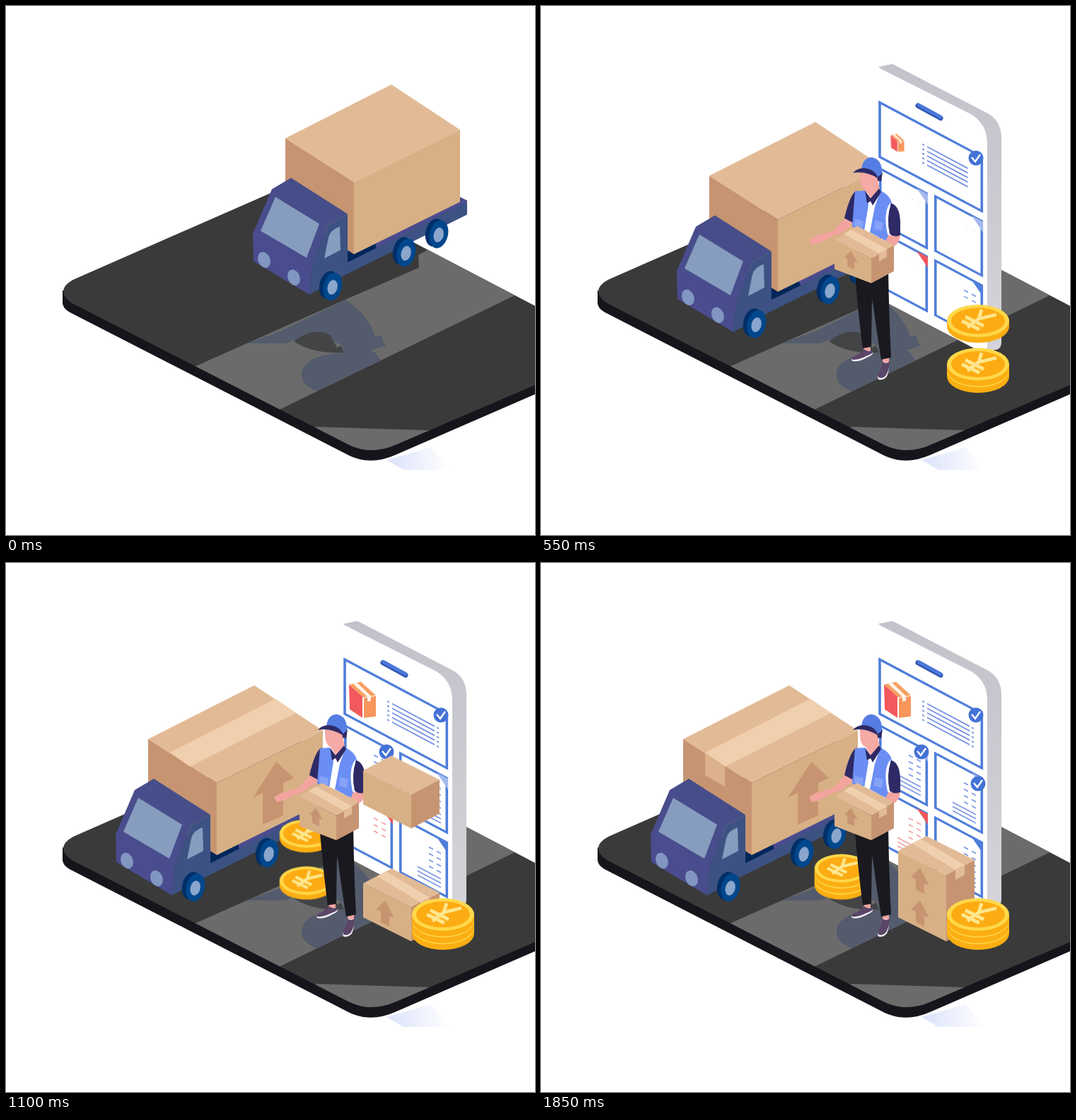
Animation of 748x748 px, one loop 2.9 s. Source, as an HTML page without scripts:

```html
<!DOCTYPE html>
<html lang="en">
<head>
<meta charset="utf-8">
<title>Delivery</title>
<style>
html, body { margin: 0; width: 100%; height: 100%; overflow: hidden; background: #fff; }
svg { display: block; width: 100%; height: 100%; }

/* every moving part shares one 2.9 s clock */
.a { animation: 2900ms linear infinite; }
.pop { transform-box: fill-box; transform-origin: center; }
.arm { transform-origin: 440px 280px; }

@keyframes drive {
  0%, 1.6% { transform: translate(0, 0); }
  12.07% { transform: translate(-125px, 35px); }
  18.97% { transform: translate(-157px, 53px); }
  25.86%, 100% { transform: translate(-194px, 62px); }
}
@keyframes phone {
  0%, 1.7% { opacity: 0; transform: translateY(24px); }
  8.62%, 100% { opacity: 1; transform: none; }
}
@keyframes person {
  0%, 3.4% { opacity: 0; transform: translateY(30px); }
  10.34%, 100% { opacity: 1; transform: none; }
}
@keyframes parcel {
  0%, 5.17% { transform: scale(0); }
  12.07% { transform: scale(1.08); }
  17.24%, 100% { transform: none; }
}
@keyframes swing {
  0%, 12.07% { transform: rotate(-12deg); }
  17.24%, 100% { transform: none; }
}

/* truck load markings */
@keyframes loadArrow {
  0%, 20.69% { clip-path: inset(100% 0 0 0); }
  25.86%, 100% { clip-path: inset(0); }
}
@keyframes loadTape {
  0%, 29.31% { clip-path: inset(0 0 0 100%); }
  36.21%, 100% { clip-path: inset(0); }
}
@keyframes loadFlap {
  0%, 39.66% { clip-path: inset(0 0 100% 0); }
  44.83%, 100% { clip-path: inset(0); }
}

/* screen content */
@keyframes lines {
  0%, 8.62% { clip-path: inset(-3px 100% -3px -3px); }
  12.07% { clip-path: inset(-3px 64% -3px -3px); }
  18.97% { clip-path: inset(-3px 12% -3px -3px); }
  20.69%, 100% { clip-path: inset(-3px); }
}
@keyframes icon {
  0%, 15.5% { transform: scale(0); }
  18.97% { transform: scale(.5); }
  25.86%, 100% { transform: none; }
}
@keyframes rows2 {
  0%, 20.69% { clip-path: inset(-3px -3px 100% -3px); }
  27.59%, 100% { clip-path: inset(-3px); }
}
@keyframes rows3 {
  0%, 25.86% { clip-path: inset(-3px -3px 100% -3px); }
  34.48%, 100% { clip-path: inset(-3px); }
}
@keyframes rows4 {
  0%, 17.24% { clip-path: inset(-3px -3px 100% -3px); }
  25.86%, 100% { clip-path: inset(-3px); }
}
@keyframes rows5 {
  0%, 34.48% { clip-path: inset(-3px -3px 100% -3px); }
  43.1%, 100% { clip-path: inset(-3px); }
}
@keyframes dot1 { 0%, 8.62% { transform: scale(0); } 12.07%, 100% { transform: none; } }
@keyframes dot2 { 0%, 32.76% { transform: scale(0); } 36.21%, 100% { transform: none; } }
@keyframes dot3 { 0%, 43.1% { transform: scale(0); } 46.55%, 100% { transform: none; } }
@keyframes tick1 { 0%, 13.79% { clip-path: inset(-3px 100% -3px -3px); } 18.97%, 100% { clip-path: inset(-3px); } }
@keyframes tick2 { 0%, 36.21% { clip-path: inset(-3px 100% -3px -3px); } 37.93%, 100% { clip-path: inset(-3px); } }
@keyframes tick3 { 0%, 48.28% { clip-path: inset(-3px 100% -3px -3px); } 53.45%, 100% { clip-path: inset(-3px); } }

/* coins: right stack, then left stack */
@keyframes coin1 {
  0%, 5.17% { opacity: 0; transform: translateY(-76px); }
  6.9% { opacity: 1; transform: translateY(-66px); }
  12.07%, 100% { opacity: 1; transform: none; }
}
@keyframes coin2 {
  0%, 10.34% { opacity: 0; transform: translateY(-74px); }
  12.07% { opacity: 1; transform: translateY(-62px); }
  17.24%, 100% { opacity: 1; transform: none; }
}
@keyframes coin3 {
  0%, 17.24% { opacity: 0; transform: translateY(-64px); }
  18.97% { opacity: 1; transform: translateY(-52px); }
  24.14%, 100% { opacity: 1; transform: none; }
}
@keyframes coin4 {
  0%, 25.86% { opacity: 0; transform: translateY(-116px); }
  27.59% { opacity: 1; transform: translateY(-106px); }
  34.48%, 100% { opacity: 1; transform: none; }
}
@keyframes coin5 {
  0%, 34.48% { opacity: 0; transform: translateY(-116px); }
  36.21% { opacity: 1; transform: translateY(-96px); }
  37.93% { opacity: 1; transform: translateY(-67px); }
  43.1%, 100% { opacity: 1; transform: none; }
}
@keyframes coin6 {
  0%, 41.38% { opacity: 0; transform: translateY(-100px); }
  43.1% { opacity: 1; transform: translateY(-80px); }
  48.28%, 100% { opacity: 1; transform: none; }
}

/* stacked crates */
@keyframes crate1 {
  0%, 20.69% { opacity: 0; transform: translateY(-110px); }
  22.41% { opacity: 1; transform: translateY(-70px); }
  25.86%, 100% { opacity: 1; transform: none; }
}
@keyframes crate2 {
  0%, 36.21% { opacity: 0; transform: translateY(-130px); }
  37.93% { opacity: 1; transform: translateY(-114px); }
  48.28% { opacity: 1; transform: translateY(-11px); }
  50%, 100% { opacity: 1; transform: none; }
}
@keyframes crateArrow {
  0%, 39.66% { clip-path: inset(100% 0 0 0); }
  46.55%, 100% { clip-path: inset(0); }
}
@keyframes crateTape {
  0%, 48.28% { clip-path: inset(0 100% 0 0); }
  55.17%, 100% { clip-path: inset(0); }
}
@keyframes crateFlap {
  0%, 62.06% { clip-path: inset(0 0 100% 0); }
  62.07%, 63.78% { clip-path: inset(0 0 50% 0); }
  63.79%, 100% { clip-path: inset(0); }
}
</style>
</head>
<body>
<svg viewBox="0 0 748 748">
  <defs>
    <linearGradient id="glow"><stop offset=".1" stop-color="#dfe5fb"/><stop offset="1" stop-color="#fff"/></linearGradient>
    <linearGradient id="edge" x2="0" y2="1"><stop stop-color="#c2c2ca"/><stop offset="1" stop-color="#d4d4da"/></linearGradient>
    <linearGradient id="cab" x1="1" x2="0" y2="1"><stop stop-color="#444f86"/><stop offset="1" stop-color="#4c4b91"/></linearGradient>
    <clipPath id="slab"><path id="top" d="M95 387L405 251Q411 248 417 251L748 424V536L552 620Q516 636 484 620L93 420Q68 402 95 387Z"/></clipPath>
    <clipPath id="band"><path id="strip" d="M262 512L480 415 584 370 583 352 596 345 606 335 728 405 384 572Z"/></clipPath>

    <g id="wheel">
      <ellipse cx="-3" cy="-1" rx="13" ry="20" fill="#002f69" transform="rotate(14)"/>
      <ellipse cx="3" rx="13" ry="20" fill="#00478c" transform="rotate(14)"/>
      <ellipse cx="3" cy="1" rx="7" ry="10.5" fill="#8aa6cd" transform="rotate(14)"/>
    </g>
    <g id="coin">
      <path d="M-44 0V8A44 23 0 0 0 44 8V0Z" fill="#fbae12"/>
      <ellipse rx="44" ry="23" fill="#ffd84a"/>
      <ellipse rx="38" ry="18.5" fill="#fcab12"/>
      <path d="M5-16L1-3 26-9M1-3L-15 9M-18-6L8 7M-23 0L2 12" fill="none" stroke="#ffe68c" stroke-width="4.8"/>
    </g>
    <path id="rows" d="M-27 20h6m5 0h6M-27 29h6m5 0h6M-27 38h6m5 0h6M-27 47h6m5 0h6M-43 56h33M-43 62h33M-43 68h33" fill="none" stroke="currentColor" stroke-width="2"/>
    <path id="fold" d="M-16 0H0V15Z"/>
    <rect id="card" x="-67.2" width="65.5" height="77"/>
    <circle id="dot" r="10.5" fill="#4472d6"/>
    <path id="tick" d="M-6-1L-1 5 6-5" fill="none" stroke="#fff" stroke-width="2.4"/>

    <g id="crate">
      <path d="M505 453L545 432 613 466 573 487Z" fill="#e2bb96"/>
      <path d="M505 453L573 487V535L505 501Z" fill="#d8b086"/>
      <path d="M573 487L613 466V514L573 535Z" fill="#c79472"/>
    </g>
    <path id="up" d="M536 477L549 502 542 499V514L530 508V493L523 490Z" fill="#c79472"/>
    <path id="tape" d="M525 443L537 436 599 473 586 480Z" fill="#f0cfae"/>
    <path id="flap" d="M586 480L599 473V487L586 494Z" fill="#e2bb96"/>
  </defs>

  <!-- ground -->
  <path d="M538 642L600 624 628 656H562Z" fill="url(#glow)"/>
  <path d="M80 402V420Q80 427 90 433L486 636Q516 650 550 635L748 549V500L516 600Z" fill="#15151b"/>
  <use href="#top" fill="#3a3a3a"/>
  <g clip-path="url(#slab)" fill="#6b6b6b">
    <use href="#strip"/>
    <path d="M437 595L600 600 560 640H480Z"/>
  </g>
  <g clip-path="url(#band)">
    <path d="M340 477L388 460 480 415Q512 436 522 467L531 466 533 475 537 480 516 487 522 490 530 502 440 545Q416 536 418 518 422 494 478 490L476 480Q440 462 412 471L395 477Z" fill="#535b6c"/>
    <path d="M407 474Q437 452 459 466L468 483 474 480 478 490Q432 492 407 474Z" fill="#434446"/>
    <path d="M515 500L521 489 528 501Z" fill="#535b6c"/>
  </g>

  <!-- truck -->
  <g class="a" style="animation-name:drive">
    <path d="M480 348L642 270 652 275V280L522 348 483 364Z" fill="#4a4c8e"/>
    <path d="M483 340L522 336 524 343 483 364Z" fill="#00265a"/>
    <path d="M470 369L522 343 652 277V295L462 389Z" fill="#3d5283"/>
    <path d="M395 187L545 111 642 175 492 249Z" fill="#e2bb96"/>
    <path d="M395 187L492 249V351L395 290Z" fill="#c79472"/>
    <path d="M492 249L642 175V277L492 351Z" fill="#d8b086"/>
    <path class="a" style="animation-name:loadArrow" d="M576 219L601 242 586 249V295L557 308V263L543 270Z" fill="#c79472"/>
    <path class="a" style="animation-name:loadTape" d="M426 206L575 130 604 150 454 226Z" fill="#f0cfae"/>
    <path class="a" style="animation-name:loadFlap" d="M426 206L454 226V254L426 238Z" fill="#dcb18b"/>
    <path d="M349 322L376 259 403 243 483 294 456 309 433 367 429 408 350 361Z" fill="url(#cab)"/>
    <path d="M456 309L483 294V378L429 408 433 367Z" fill="#3d5283"/>
    <path d="M381 270L443 308 425 356 360 318Z" fill="#869dbf"/>
    <path d="M450 357L456 327Q459 316 472 312L473 345Z" fill="#869dbf"/>
    <g fill="#8196c0">
      <ellipse cx="365" cy="359" rx="8.5" ry="11.5" transform="rotate(-22 365 359)"/>
      <ellipse cx="407" cy="384" rx="8.5" ry="11.5" transform="rotate(-22 407 384)"/>
    </g>
    <use href="#wheel" x="459" y="396"/>
    <use href="#wheel" x="563" y="348"/>
    <use href="#wheel" x="609" y="322"/>
  </g>

  <!-- phone -->
  <g class="a" style="animation-name:phone">
    <path d="M477 86L497 82 632 152Q651 163 651 186V476Q651 484 644 486L622 490 600 200Z" fill="url(#edge)"/>
    <path d="M477 87L608 153Q631 167 631 194V480Q630 492 620 488L469 409V96Q469 88 477 87Z" fill="#fff"/>
    <path d="M533 141L565 158.5" stroke="#2f52ad" stroke-width="7" stroke-linecap="round"/>
    <path d="M534 140L565 157" stroke="#4a78da" stroke-width="5" stroke-linecap="round"/>
    <g fill="none" stroke="#4f7edb" stroke-width="3.6">
      <g transform="translate(625 214) skewY(28)">
        <rect x="-146" width="144.3" height="77"/>
        <path class="a" style="animation-name:lines" stroke="#7895e2" stroke-width="2.2" d="M-86 27h3m4 0h60m3 0h3M-86 33.5h3m4 0h60m3 0h3M-86 40h3m4 0h60m3 0h3M-86 46.5h3m4 0h60m3 0h3M-86 53h3m4 0h60m3 0h3"/>
      </g>
      <g transform="translate(547 266) skewY(28)" color="#7f9be4">
        <use href="#card"/>
        <use href="#fold" fill="#a5baec" stroke="none"/>
        <g class="a" style="animation-name:rows2"><use href="#rows"/></g>
      </g>
      <g transform="translate(625 305) skewY(28)" color="#7f9be4">
        <use href="#card"/>
        <use href="#fold" fill="#a5baec" stroke="none"/>
        <g class="a" style="animation-name:rows3"><use href="#rows"/></g>
      </g>
      <g transform="translate(625 396) skewY(28)" color="#7f9be4">
        <use href="#card"/>
        <use href="#fold" fill="#4f7edb" stroke="none"/>
        <g class="a" style="animation-name:rows4"><use href="#rows"/></g>
      </g>
      <g transform="translate(547 355) skewY(28)" color="#f4a4a6">
        <use href="#card"/>
        <use href="#fold" fill="#f0585d" stroke="none"/>
        <g class="a" style="animation-name:rows5"><use href="#rows"/></g>
      </g>
    </g>
    <g class="a pop" style="animation-name:icon">
      <path d="M485 172L502 168 523 187 505 190Z" fill="#f7a063"/>
      <path d="M485 172L504 189V219L486 207Z" fill="#f2595c"/>
      <path d="M506 191L523 188V217L506 219Z" fill="#f8965c"/>
      <path d="M491 171L496 169 516 188V195L511 196V189Z" fill="#fff3ea"/>
    </g>
    <g transform="translate(615 215)">
      <use class="a pop" style="animation-name:dot1" href="#dot"/>
      <use class="a" style="animation-name:tick1" href="#tick"/>
    </g>
    <g transform="translate(538 267)">
      <use class="a pop" style="animation-name:dot2" href="#dot"/>
      <use class="a" style="animation-name:tick2" href="#tick"/>
    </g>
    <g transform="translate(618 312)">
      <use class="a pop" style="animation-name:dot3" href="#dot"/>
      <use class="a" style="animation-name:tick3" href="#tick"/>
    </g>
  </g>

  <!-- left coins -->
  <g transform="translate(425 449) scale(.87)">
    <g class="a" style="animation-name:coin4"><use href="#coin"/></g>
    <g class="a" style="animation-name:coin5"><use href="#coin" y="-10"/></g>
    <g class="a" style="animation-name:coin6"><use href="#coin" y="-20"/></g>
  </g>

  <!-- courier -->
  <g class="a" style="animation-name:person">
    <path d="M456 480H466V490H456ZM483 496H492V506H483Z" fill="#f3a49f"/>
    <path d="M439 499Q452 493 456 486L469 489Q471 493 461 497 450 504 440 502ZM476 524Q481 512 482 503L492 504Q493 514 489 524 483 530 477 528Z" fill="#f3f1f7"/>
    <path d="M439 497Q452 492 456 485 463 490 469 487 472 491 460 495 449 501 440 500ZM476 522Q481 512 482 502 487 507 493 503 493 513 488 522 483 528 477 525Z" fill="#5b4668"/>
    <path d="M443 370H491Q492 440 495 497L481 500Q473 450 468 410L467 482 455 484Q449 440 443 370Z" fill="#19191f"/>
    <g class="a arm" style="animation-name:swing">
      <path d="M430 300L442 306Q430 321 409 327L392 336 383 338 379 331 389 325 414 318Z" fill="#f3a49f"/>
      <path d="M446 261Q437 266 429 300L442 307 447 290Z" fill="#2e2a66"/>
    </g>
    <path d="M456 264L480 262 476 325 452 318Z" fill="#fff"/>
    <path d="M444 262L458 261 463 281 457 318 440 312Z" fill="#6b8ef4"/>
    <path d="M480 261Q493 267 496 278L493 335 465 320 472 284Z" fill="#6b8ef4"/>
    <path d="M444 301L456 304 455 314 443 311ZM472 303L484 306 482 318 471 315Z" fill="#86a3f8"/>
    <path d="M493 320L508 322Q508 336 497 341L486 335Z" fill="#f3a49f"/>
    <path d="M495 277Q483 290 490 323L494 325V280Z" fill="#fff"/>
    <path d="M495 279Q507 282 508 305V324Q500 328 493 322 488 300 495 279Z" fill="#2e2a66"/>
    <path d="M451 235L478 240 477 251 479 258 467 273 459 260Q450 257 451 235Z" fill="#f6aaa5"/>
    <path d="M458 261L466 272 478 258 481 263 469 282 466 276 461 279Z" fill="#2e2a66"/>
    <path d="M475 238L483 235 481 248 476 247Z" fill="#2e2a66"/>
    <path d="M453 231Q455 214 468 214 483 217 482 237L476 242Q471 231 453 231Z" fill="#567de3"/>
    <path d="M441 236Q449 227 462 230 474 233 477 244 460 233 441 236Z" fill="#2e2a66"/>
    <g class="a pop" style="animation-name:parcel">
      <path d="M415 330L447 311 499 338 467 357Z" fill="#e2bb96"/>
      <path d="M415 330L467 357V392L415 372Z" fill="#d8b086"/>
      <path d="M467 357L499 338V375L467 392Z" fill="#c79472"/>
      <path d="M428 322L438 316 489 344 478 350Z" fill="#f0cfae"/>
      <path d="M478 350L489 344V355L478 361Z" fill="#e2bb96"/>
      <path d="M438 346L448 363 443 361V372L433 368V357L429 356Z" fill="#c79472"/>
    </g>
  </g>

  <!-- crates -->
  <g class="a" style="animation-name:crate1">
    <use href="#crate"/><use href="#up"/><use href="#tape"/><use href="#flap"/>
  </g>
  <g transform="translate(0 -46)">
    <g class="a" style="animation-name:crate2">
      <use href="#crate"/>
      <use class="a" style="animation-name:crateArrow" href="#up"/>
      <use class="a" style="animation-name:crateTape" href="#tape"/>
      <use class="a" style="animation-name:crateFlap" href="#flap"/>
    </g>
  </g>

  <!-- right coins -->
  <g transform="translate(618 516)">
    <g class="a" style="animation-name:coin1"><use href="#coin"/></g>
    <g class="a" style="animation-name:coin2"><use href="#coin" y="-9.5"/></g>
    <g class="a" style="animation-name:coin3"><use href="#coin" y="-19"/></g>
  </g>
</svg>
</body>
</html>
```
